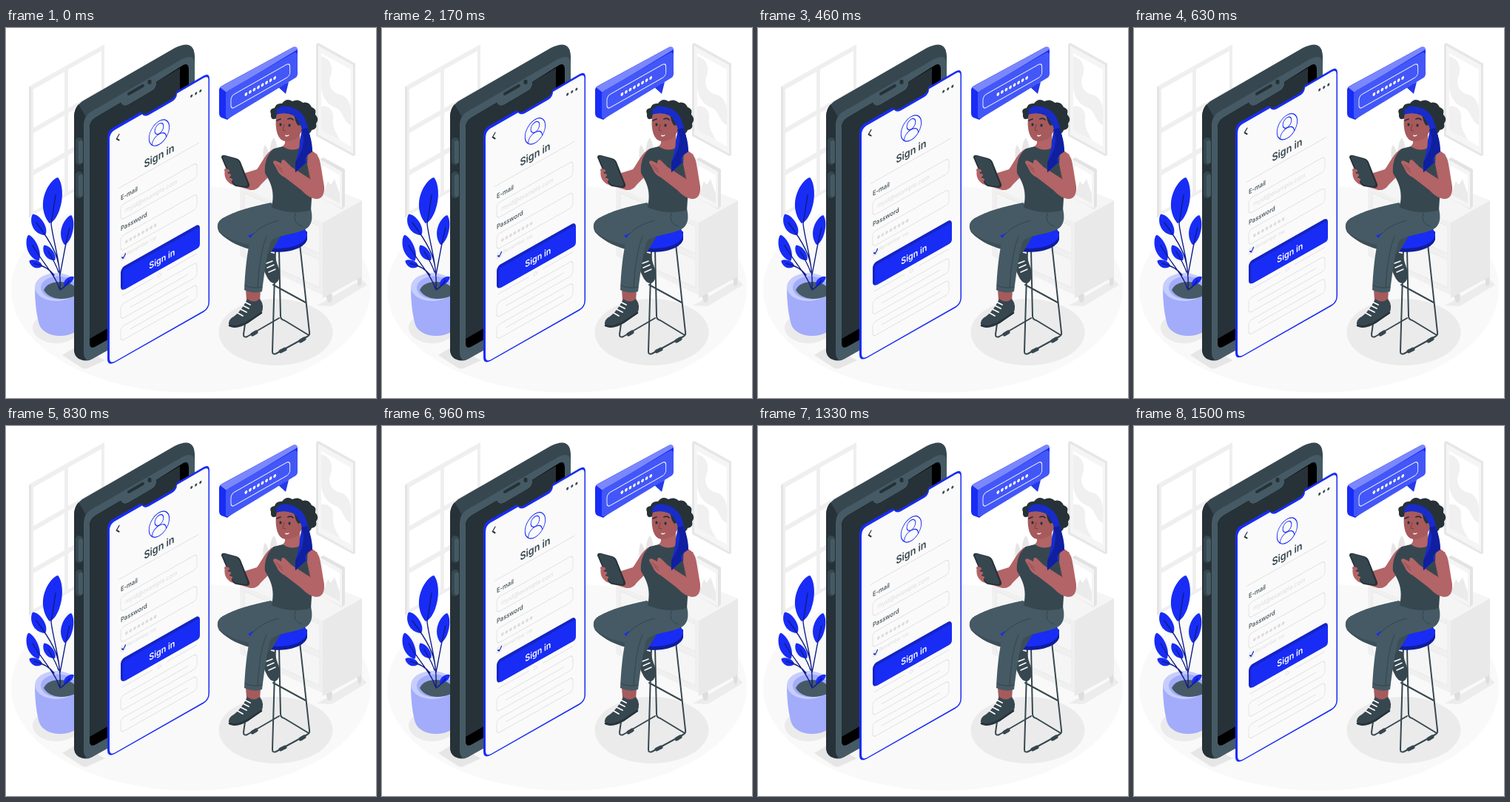
These frames come from a looping animation (500 by 500 pixels, 1540 ms). An HTML page:

```html
<!DOCTYPE html>
<html lang="en">
<head>
<meta charset="utf-8">
<title>Sign in</title>
<style>
  html, body { margin: 0; width: 100%; height: 100%; overflow: hidden; background: #fff; }
  svg { display: block; width: 100vw; height: 100vh; }
  text { font-family: Inter, "Open Sans", sans-serif; }
  .line { fill: none; stroke-linecap: round; stroke-linejoin: round; }
  .field { fill: none; stroke: #e0e0e0; }
  .hint { fill: #dcdcdc; }
</style>
</head>
<body>
<svg viewBox="0 0 500 500">
  <defs>
    <path id="leaf" d="M0 0C-.35-.12-.62-.35-.48-.62C-.38-.82-.1-.98.1-1C.38-.9.58-.6.42-.3C.32-.12.15-.03 0 0Z"/>
  </defs>

  <ellipse cx="250" cy="353" rx="243" ry="140" fill="#f9f9f9"/>

  <g id="window">
    <path d="M31 79L133 22V198L31 256Z" fill="#efefef"/>
    <path d="M31 79L34 81V254L31 256Z" fill="#e4e4e4"/>
    <path d="M37 83L79 59V111L37 135ZM84 56L129 31V83L84 108ZM37 142L79 118V168L37 192ZM84 115L129 90V140L84 165ZM37 199L79 175V224L37 248ZM84 172L129 147V196L84 221Z" fill="#fff"/>
  </g>

  <g id="wall-picture">
    <path d="M419 22L422 20L472 48V172L469 173L419 146Z" fill="#e6e6e6"/>
    <path d="M422 24L469 50V170L422 144Z" fill="#f5f5f5"/>
    <path d="M426 34L466 56V160L426 138Z" fill="#fff"/>
    <path d="M426 38C438 42 443 52 439 64C434 76 440 88 452 90C460 92 465 100 466 110V131C456 128 456 112 446 108C434 104 426 92 426 78ZM426 106C436 104 444 112 442 124C441 134 446 142 452 152L426 138Z" fill="#f0f0f0"/>
  </g>

  <g id="cabinet">
    <path d="M420 375L436 366L481 340L488 347L440 376Z" fill="#ececec"/>
    <path d="M430 355L441 360L440 370L435 371ZM474 336L481 332L480 347L476 349Z" fill="#dedede"/>
    <path d="M316 214L367 186L481 233L428 263Z" fill="#f5f5f5"/>
    <path d="M316 214L428 263V361L316 308Z" fill="#f0f0f0"/>
    <path d="M428 263L481 233V336L428 365Z" fill="#e9e9e9"/>
    <path d="M322 223L424 268V305L322 260ZM322 268L424 313V351L322 305Z" fill="#f5f5f5" stroke="#e8e8e8"/>
    <path d="M350 187C346 174 347 162 350 158C354 162 355 168 356 174C356 162 358 153 362 148C367 156 367 164 366 172C370 162 373 160 376 160V190Z" fill="#e6e6e6"/>
    <path d="M425 177L429 175L458 191V241L454 245L425 229Z" fill="#e3e3e3"/>
    <path d="M425 178L454 194V244L425 229Z" fill="#f5f5f5"/>
    <path d="M428 186L451 199V237L428 225Z" fill="#fff"/>
    <path d="M428 225L435 207L439 212L444 204L451 224V237Z" fill="#ebebeb"/>
  </g>

  <ellipse cx="364.500" cy="411" rx="77" ry="45" fill="#ebebeb"/>
  <ellipse cx="68" cy="405" rx="32" ry="21" fill="#ebebeb"/>
  <path d="M76 442L96 430L134 449L112 459Q107 462 102 459Z" fill="#e6e6e6"/>

  <g id="plant">
    <path d="M39 349C39 371 41 387 45 401C49 411 61 417 76 416Q88 415 96 409V349Z" fill="#a2acfb"/>
    <ellipse cx="68" cy="350" rx="29" ry="19" fill="#c7cdfd"/>
    <ellipse cx="71" cy="351" rx="24" ry="15.500" fill="#a2acfb"/>
    <path d="M51 354Q56 343 74 343Q90 344 95 352V361Q86 366 74 366Q57 365 51 354Z" fill="#455a64"/>
    <g fill="#182cf5">
      <use href="#leaf" transform="translate(59 264) rotate(8) scale(25 63)"/>
      <use href="#leaf" transform="translate(53 280) rotate(-33) scale(16 33)"/>
      <use href="#leaf" transform="translate(79 293) rotate(11) scale(16 41)"/>
      <use href="#leaf" transform="translate(44 315) rotate(-23) scale(15 38)"/>
      <use href="#leaf" transform="translate(66 314) rotate(-38) scale(12 25)"/>
      <use href="#leaf" transform="translate(49 322) rotate(-70) scale(10 19)"/>
      <use href="#leaf" transform="translate(78 348) rotate(47) scale(8 18)"/>
    </g>
    <path class="line" d="M73 354C75 320 64 290 61 265L67 226M72 325C70 308 62 291 41 263M73 333C78 309 80 292 86 270M72 352C67 335 51 319 36 294M71 330Q68 320 57 302M65 334Q56 322 38 318M73 354Q80 350 86 341" stroke="#101d86" stroke-width="1.400"/>
  </g>

  <g id="phone">
    <path d="M92 120Q92 107 103 99L228 27Q254 14 255 38V360L115 448Q108 451 101 448Q92 443 92 434Z" fill="#37474f"/>
    <path d="M92 120Q92 110 98 103L108 120V449Q92 449 92 434Z" fill="#263238"/>
    <path d="M105 131Q105 119 115 113L238 42Q255 33 255 50V370L117 447Q106 452 105 440Z" fill="#455a64"/>
    <path d="M113 135Q113 126 121 121L155 101Q158 107 165 104L199 84Q204 80 203 73L238 51Q247 45 247 57V360L120 431Q113 434 113 426Z" fill="#000"/>
    <path d="M113 135Q113 126 121 121L155 101Q158 107 165 104L199 84Q204 80 203 73L235 54V350L113 420Z" fill="#263238"/>
    <path class="line" d="M166 89L185 78" stroke="#263238" stroke-width="4"/>
    <ellipse cx="194" cy="73" rx="2.600" ry="3.200" fill="#263238"/>
    <path class="line" d="M99 153V180M99 199V225" stroke="#37474f" stroke-width="10"/>
    <path class="line" d="M101 155V180M101 201V225" stroke="#455a64" stroke-width="6"/>
  </g>

  <g id="panel">
    <path d="M137 149Q137 139 144 135L182 113.500Q185 118 191 115L224 96Q230 92 230 86L267 64.500Q275 60 275 69V370Q275 379 267 384L147 452Q137 457 137 447Z" fill="#182cf5"/>
    <path d="M140 150.500Q140 142 146.500 138L184 116.500Q187 120.500 193 117.500L225 99Q231 95 231 88.500L267 67.500Q273.500 64 273.500 70V370Q273.500 378 267 382L147 450.500Q140 454 140 446Z" fill="#fafafa"/>
    <g transform="matrix(.866 -.49 0 1 155 0)">
      <path class="line" d="M-2.500 142.500l-4 4 4 4" stroke="#263238" stroke-width="1.700"/>
      <path class="line" d="M110.500 146h14.500" stroke="#37474f" stroke-width="3.600" stroke-dasharray="0 7"/>
      <g class="line" stroke="#182cf5" stroke-width="1.100">
        <circle cx="60" cy="171" r="15.800"/>
        <circle cx="60" cy="165.500" r="6.800"/>
        <path d="M49 182C49 169.500 71 169.500 71 182"/>
      </g>
      <text x="60" y="207.200" font-size="14.500" font-weight="600" text-anchor="middle" fill="#37474f">Sign in</text>
      <path d="M-3 215H122M14 384.500h91M14 414h91M2 363h48M72 363h47" stroke="#e0e0e0"/>
      <g class="field">
        <rect y="240" width="119" height="20" rx="5"/>
        <rect y="282" width="119" height="20" rx="5"/>
        <rect y="374.500" width="119" height="19.500" rx="5"/>
        <rect y="404.500" width="119" height="19" rx="5"/>
        <rect x=".5" y="307.500" width="7" height="7" rx="1"/>
      </g>
      <g font-size="8.800" font-weight="500" fill="#37474f">
        <text y="233">E-mail</text>
        <text y="274.500">Password</text>
      </g>
      <text class="hint" x="7" y="253" font-size="8.500">myid@example.com</text>
      <path class="line" d="M9 293h45.500" stroke="#dcdcdc" stroke-width="4.300" stroke-dasharray="0 6.400"/>
      <path class="line" d="M2 311l2 2 3.500-4.500" stroke="#1424c4" stroke-width="1.600"/>
      <text class="hint" x="10" y="312" font-size="6.700">Remember me</text>
      <text class="hint" x="61" y="366" font-size="7" text-anchor="middle">Or</text>
      <rect y="324.500" width="123.500" height="31.500" rx="6" fill="#1424c4"/>
      <rect x="3.500" y="329" width="120" height="27.500" rx="4" fill="#182cf5"/>
      <text x="64.500" y="348" font-size="12.400" font-weight="600" text-anchor="middle" fill="#fff">Sign in</text>
    </g>
  </g>

  <g id="bubble">
    <path d="M368 80L382 73L378 89Z" fill="#2439e6"/>
    <path d="M288 84Q288 80 292 78L386 27Q393 23 394 30V50L299 124L291 121Q288 119 288 116Z" fill="#182cf5"/>
    <path d="M289 80L387 26.500Q392 24 394 29L298 87Z" fill="#7b88fc"/>
    <path d="M297 90Q297 86 301 84L388 34Q394 31 394 37V62Q394 66 390 68L302 121.500Q297 124 297 119Z" fill="#4357f8"/>
    <g class="line" stroke="#fff" transform="matrix(.866 -.49 0 1 304 0)">
      <rect y="92" width="92" height="18" rx="5"/>
      <path d="M23.500 101h45" stroke-width="4.300" stroke-dasharray="0 6.400"/>
    </g>
  </g>

  <g id="stool">
    <g class="line" stroke="#37474f" stroke-width="2">
      <path d="M337 300L321 414Q321 419 326 417L369 392M364 300L360 437Q360 442 365 440L407 417Q411 415 410 411L397 292M369 299L371 389Q371 394 376 395L409 415M361 347L405 371"/>
      <path d="M333 414l5-3M371 437l6-3M398 423l5-3" stroke-width="5"/>
    </g>
    <path d="M328 279V288C337 308 400 308 407 286V275Z" fill="#101d9a"/>
    <ellipse cx="367" cy="279" rx="40" ry="19" fill="#182cf5"/>
  </g>

  <g id="woman">
    <path d="M350 302L363 305Q365 316 369 326Q372 341 364 345Q356 345 352 335Q346 325 348 313Z" fill="#37474f"/>
    <path class="line" d="M352 318l8-3M353 324l9-4M355 330l9-4" stroke="#fff" stroke-width="1.500"/>
    <path d="M358 237C334 241 310 247 293 257Q282 264 288 276C301 290 318 296 336 301L357 305L388 253Z" fill="#3c4f58"/>
    <path d="M358 236C332 241 310 248 293 257Q282 264 288 275C302 287 319 291 334 294L395 263Z" fill="#455a64"/>
    <path d="M327 281L338 275L332 285Z" fill="#182cf5"/>
    <path d="M324 354L344 354L343 370Q334 378 325 367Z" fill="#a65a5c"/>
    <path d="M358 238L412 244C416 262 411 270 400 274C380 281 363 280 357 290C352 309 349 332 346 356Q335 360 322 354C323 331 325 308 330 286C334 271 351 266 367 260Z" fill="#455a64"/>
    <path class="line" d="M368 260Q343 267 333 280M323 348Q334 353 346 350M391 250Q386 263 400 268M352 282Q343 302 340 350" stroke="#34454d"/>
    <path d="M326 366Q335 373 343 366Q350 375 345 386L327 399Q309 409 302 402Q298 395 309 389Q319 381 326 366Z" fill="#37474f"/>
    <path class="line" d="M302 402Q311 406 327 397L345 385" stroke="#263238" stroke-width="2.500"/>
    <path class="line" d="M313 385l7 4M317 380l8 4M320 375l8 4M322 370l8 4" stroke="#fff" stroke-width="1.800"/>

    <path d="M362 163C351 168 346 182 339 191L323 196L309 196Q301 187 296 191Q293 204 304 211L330 219Q339 220 344 212L363 193Z" fill="#b26467"/>
    <path d="M291 175Q291 171 296 172L311 176Q315 177 317 181L329 211Q330 216 325 216L311 214Q307 213 305 208Z" fill="#263238"/>
    <path d="M293 175Q293 172 297 173L310 177Q314 178 315 181L326 210Q327 214 323 214L311 212Q308 211 306 207Z" fill="#37474f"/>
    <path class="line" d="M297 192l3 1M298 198l4 1M301 204l3 1" stroke="#b26467" stroke-width="4"/>

    <path d="M377 145L397 144Q397 158 406 163L421 171L411 186L361 181L360 166Q376 162 377 155Z" fill="#b26467"/>
    <path d="M362 163C352 171 349 184 350 196C357 208 364 220 359 242C374 250 398 251 412 246L414 216Q417 189 406 165L397 162Q386 168 374 160Z" fill="#37474f"/>
    <path d="M408 164Q423 168 425 184L430 214Q431 231 419 231Q409 230 399 219L377 202Q369 199 365 189L361 182Q361 178 366 180L372 183Q372 176 377 179L386 188L411 204L407 184Z" fill="#b26467"/>
    <path class="line" d="M365 185l8 6M368 190l6 5M411 204l-2-10" stroke="#8f484d"/>

    <path d="M366 122Q357 126 358 116Q355 109 363 108Q365 101 373 102Q379 94 387 99Q395 95 401 101Q409 99 413 107Q420 109 418 117Q424 123 419 129Q421 137 413 138Q411 145 402 142L388 130Z" fill="#263238"/>
    <path d="M366 116C363 128 365 143 370 149Q375 155 385 152Q395 150 398 142Q404 137 402 131Q398 127 395 132L391 115Q379 108 366 116Z" fill="#a65a5c"/>
    <path d="M389 113Q390 127 395 132L400 130L396 116Z" fill="#263238"/>
    <path d="M365 117Q364 108 372 106C390 104 403 114 407 131C411 145 413 156 414 167Q402 174 407 181L391 195C389 180 397 169 397 152L400 137Q396 123 388 118Q377 113 365 117Z" fill="#182cc9"/>
    <path d="M399 137C406 153 400 168 391 181L391 195L405 182Q401 174 414 167Q414 151 407 135Z" fill="#101f9f"/>
    <g class="line" stroke="#263238">
      <path d="M366 125l5-2M381 123q4-2 7 1" stroke-width="1.700"/>
      <path d="M371 130v1M383 131v1" stroke-width="3"/>
      <path d="M376 130l-2 8 4 1" stroke="#7d3d42"/>
    </g>
    <path d="M377 144.500Q380 145.500 383 144Q382 147 378 146.500Z" fill="#fff"/>
  </g>
</svg>
<script>
  const panel = document.getElementById("panel");
  const LOOP = 1540, POSES = 37, LIFT = 10;

  // Linear rise and fall, with the same resting pose at both ends of the loop.
  function draw(now) {
    const pose = Math.floor((now % LOOP) / LOOP * POSES + 0.1) % POSES;
    const half = (POSES - 1) / 2;
    const rise = LIFT * (1 - Math.abs(pose / half - 1));
    panel.setAttribute("transform", `translate(0 ${-rise})`);
    requestAnimationFrame(draw);
  }
  draw(performance.now());
</script>
</body>
</html>
```
